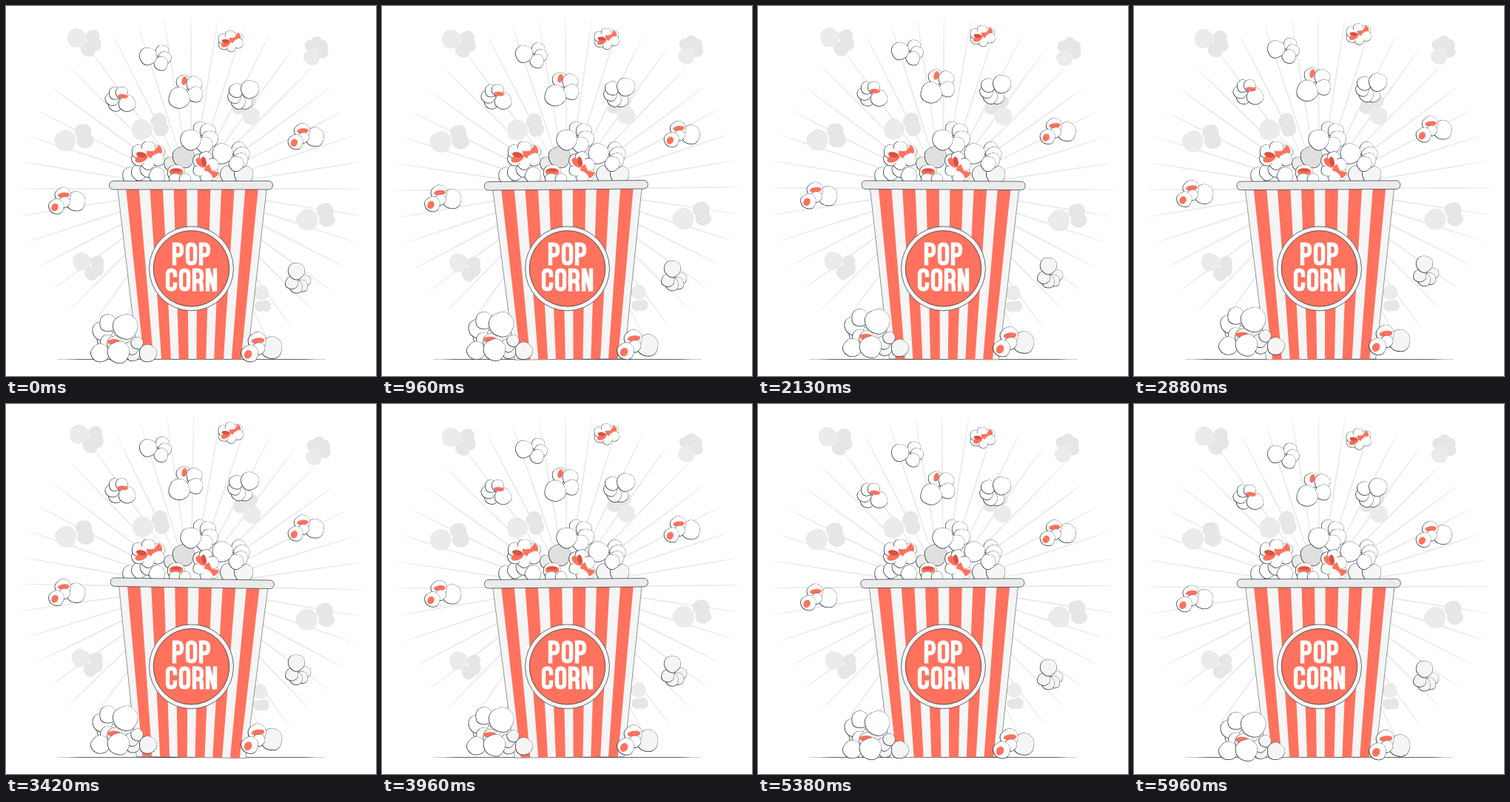
An HTML page with a canvas for the animation above (6 s loop, 500 px wide and 500 px high).

```html
<!DOCTYPE html>
<html lang="en">
<head>
<meta charset="utf-8">
<title>Popcorn</title>
<style>
html, body { margin: 0; width: 100%; height: 100%; overflow: hidden; background: #fff; }
canvas { display: block; width: 500px; height: 500px; }
</style>
</head>
<body>
<canvas id="stage" role="img" aria-label="POP CORN"></canvas>
<script>
const canvas = document.getElementById('stage');
const ctx = canvas.getContext('2d');
const ratio = window.devicePixelRatio || 1;
canvas.width = canvas.height = 500 * ratio;

const INK = '#263238', RED = '#ff725e', DEEP = '#d9503f';
const WHITE = '#fff', PALE = '#f5f5f5', GREY = '#ebebeb', DIM = '#e6e6e6';
const FLOAT_MS = 6000, SWAY_MS = 1500, TAU = Math.PI * 2;

// Repeatable value from 0 to 1
function noise(n) {
  const v = Math.sin(n * 12.9898) * 43758.5453;
  return v - Math.floor(v);
}

function at(x, y, turn, scale, draw) {
  ctx.save();
  ctx.translate(x, y);
  ctx.rotate(turn);
  ctx.scale(scale, scale);
  draw();
  ctx.restore();
}

function spot(x, y, rx, ry = rx, turn = 0, fill = RED) {
  ctx.beginPath();
  ctx.ellipse(x, y, rx, ry, turn, 0, TAU);
  ctx.fillStyle = fill;
  ctx.fill();
}

// Slightly uneven disc
function lump(x, y, r, seed, fill) {
  ctx.beginPath();
  for (let i = 0; i < 48; i++) {
    const a = i / 48 * TAU;
    const k = r * (1 + 0.03 * Math.sin(3 * a + seed) + 0.015 * Math.sin(5 * a + seed * 2));
    ctx.lineTo(x + k * Math.cos(a), y + k * Math.sin(a));
  }
  ctx.fillStyle = fill;
  ctx.fill();
}

// The shifted inner disc leaves an outline heavier at the lower left
function lobe(x, y, r, fill = WHITE) {
  lump(x, y, r, x + y, INK);
  lump(x + 0.25, y - 0.25, r - 0.5, x + y, fill);
}

// One large lobe with a fan of n smaller ones pointing along turn
function puff(x, y, r, turn, { n = 3, spread = 1, fill = WHITE, fan = fill, draw = lobe } = {}) {
  const c = Math.cos(turn), s = Math.sin(turn);
  for (let i = 0; i < n; i++) {
    const a = turn + (i - (n - 1) / 2) * spread;
    const size = r * (0.7 + 0.12 * noise(x + i));
    draw(x + r * (0.25 * c + 0.8 * Math.cos(a)), y + r * (0.25 * s + 0.8 * Math.sin(a)), size, fan);
  }
  draw(x - 0.85 * r * c, y - 0.85 * r * s, r, fill);
}

function shadow(x, y, r, turn, n) {
  const draw = (px, py, size, fill) => lump(px, py, size, px, fill);
  puff(x, y, r, turn, { n, fill: GREY, fan: DIM, draw });
}

function bowTie(x, y, turn) {
  at(x, y, turn, 1, () => {
    ctx.fillStyle = RED;
    for (const side of [-1, 1]) {
      ctx.beginPath();
      ctx.moveTo(0, -2.5);
      ctx.quadraticCurveTo(side * 5, -4, side * 9, -7);
      ctx.quadraticCurveTo(side * 13, 0, side * 8, 5);
      ctx.quadraticCurveTo(side * 5, 2, 0, 2.5);
      ctx.fill();
    }
  });
}

function bowKernel() {
  for (let i = 0; i < 6; i++) {
    const a = -0.5 + i * TAU / 6;
    lobe(15 * Math.cos(a), 10 * Math.sin(a), 9.5);
  }
  spot(0, 0, 15, 11, 0, WHITE);
  spot(-9, 4, 9, 5, -0.4);
  spot(-9, -1, 7, 3.5, 0.2, DEEP);
  bowTie(9, -4, -0.45);
}

function dropKernel(tone) {
  lobe(12, -1, 13.5, tone);
  lobe(-5, -9, 11);
  spot(-4, -9.5, 8, 3.5, -0.1);
  lobe(-3, 0, 7.5);
  lobe(-14, 6, 10.5);
  spot(-16, 7, 4.5, 5.5, 0.5);
}

function rays() {
  for (let i = 0; i < 40; i++) {
    at(250, 247, i * TAU / 40, 1, () => spot(0, -135, 1, 98, 0, GREY));
  }
}

function shadows() {
  shadow(106, 47, 13, 0.35, 3);
  shadow(418, 61, 11, -1.05, 4);
  shadow(92, 179, 14.5, -0.25, 2);
  shadow(195, 164, 14, -0.25, 2);
  shadow(326, 140, 12, -2.1, 3);
  shadow(419, 286, 14.5, -0.25, 2);
  shadow(112, 350, 12.5, 0.45, 3);
  shadow(346, 396, 10, 1.5, 2);
}

function heap() {
  lobe(222, 213, 9, GREY);
  lobe(240, 204, 15, '#e0e0e0');
  for (const x of [302, 321]) lobe(x, 228, 13, PALE);
  puff(261, 178, 14, -0.25, { n: 4 });
  puff(304, 202, 14, 0.2, { n: 4, spread: 0.7 });
  for (let i = 0; i < 4; i++) lobe(168 + i * 12, 229 - 4 * (i % 3), 11);
  lobe(230, 226, 12);
  spot(230, 224, 9.5, 5);
  spot(230, 222, 7, 2, 0, DEEP);
  for (const x of [228, 242]) lobe(x, 234, 8);
  at(192, 202, 0, 1, bowKernel);
  at(270, 218, 1.15, 0.93, bowKernel);
}

// Horizontal place on the cup: -1 and 1 are its sides, 0 its middle
function band(from, to, fill) {
  const top = 244, foot = 477.5;
  ctx.beginPath();
  ctx.moveTo(251.5 + from * 101, top);
  ctx.lineTo(251.5 + to * 101, top);
  ctx.lineTo(252 + to * 74, foot);
  ctx.lineTo(252 + from * 74, foot);
  ctx.closePath();
  ctx.fillStyle = fill;
  ctx.fill();
}

function cup() {
  ctx.strokeStyle = INK;
  ctx.lineWidth = 0.5;
  band(-1, 1, PALE);
  ctx.stroke();
  for (let i = 0; i < 6; i++) {
    const mid = (i - 2.5) * 0.32;
    band(mid - 0.087, mid + 0.087, RED);
  }
  ctx.beginPath();
  ctx.roundRect(139.5, 236.5, 221, 11.5, 5.5);
  ctx.fillStyle = GREY;
  ctx.fill();
  ctx.lineWidth = 0.7;
  ctx.stroke();
}

// Condensed lettering in a 16 x 31 box
const bowl = 'M3 31V2.7H8Q13 2.7 13 10T8 17.3H3';
const glyphs = {
  P: bowl,
  R: bowl + 'M7 17.3Q12.6 17.3 12.6 22L13 31',
  O: 'M3 8V23Q3 28.3 8 28.3T13 23V8Q13 2.7 8 2.7T3 8Z',
  C: 'M13 12V8Q13 2.7 8 2.7T3 8V23Q3 28.3 8 28.3T13 23V19',
  N: 'M3 31V0M13 31V0M3.5 0L12.5 31'
};

function word(text, y) {
  const pitch = 18;
  const left = 250.5 - ((text.length - 1) * pitch + 16) / 2;
  ctx.strokeStyle = WHITE;
  ctx.lineWidth = 5.4;
  [...text].forEach((c, i) => at(left + i * pitch, y, 0, 1, () => ctx.stroke(new Path2D(glyphs[c]))));
}

function seal() {
  ctx.strokeStyle = INK;
  ctx.lineWidth = 0.7;
  spot(250.5, 354.8, 57, 57, 0, PALE);
  ctx.stroke();
  spot(250.5, 354.8, 51.3);
  ctx.stroke();
  word('POP', 319.5);
  word('CORN', 354.5);
}

function pile() {
  puff(182, 466, 12, -2.8, { fill: PALE });
  puff(148, 439, 17, 2.75, { n: 4 });
  lobe(138, 455, 11);
  lobe(147, 457, 11);
  spot(146, 454, 9, 4);
  lobe(127, 469, 12.5);
  lobe(152, 468, 15);
}

function floaters() {
  puff(202, 69, 12, 0.1);
  at(303.5, 47.5, -0.1, 0.75, bowKernel);
  puff(243, 116, 14.5, -0.75, { spread: 1.3 });
  spot(241, 101, 3.5, 6, 0.25);
  puff(155, 127, 11.5, Math.PI + 0.5, { n: 4 });
  spot(158, 122, 7, 3, 0.1);
  puff(321, 119, 12.5, 2.5, { n: 4, spread: 0.9 });
  puff(394, 368, 11.5, 1.4, { n: 4, spread: 0.9, fill: PALE });
  at(405, 178, 0, 0.98, () => dropKernel(WHITE));
  at(82, 265, 0, 1, () => dropKernel(WHITE));
  pile();
  at(345, 463, 0, 1.12, () => dropKernel(PALE));
}

function render(now) {
  const phase = now % FLOAT_MS / FLOAT_MS;
  const lift = -10 * (1 - Math.abs(1 - 2 * phase));
  const turn = (now / SWAY_MS + 0.25) % 1;
  const angle = (1 - 4 * Math.abs(turn - 0.5)) * Math.PI / 180;
  const sway = (x, y, draw) => at(x, y, angle, 1, () => {
    ctx.translate(-x, -y);
    draw();
  });

  ctx.setTransform(ratio, 0, 0, ratio, 0, 0);
  ctx.fillStyle = WHITE;
  ctx.fillRect(0, 0, 500, 500);
  sway(250, 247, rays);
  sway(250, 250, shadows);
  spot(250.5, 477.6, 183, 0.5, 0, INK);
  heap();
  sway(251, 357, cup);
  seal();
  at(0, lift, 0, 1, floaters);
}

const start = performance.now();
function tick() {
  render(performance.now() - start);
  requestAnimationFrame(tick);
}
tick();
</script>
</body>
</html>
```
